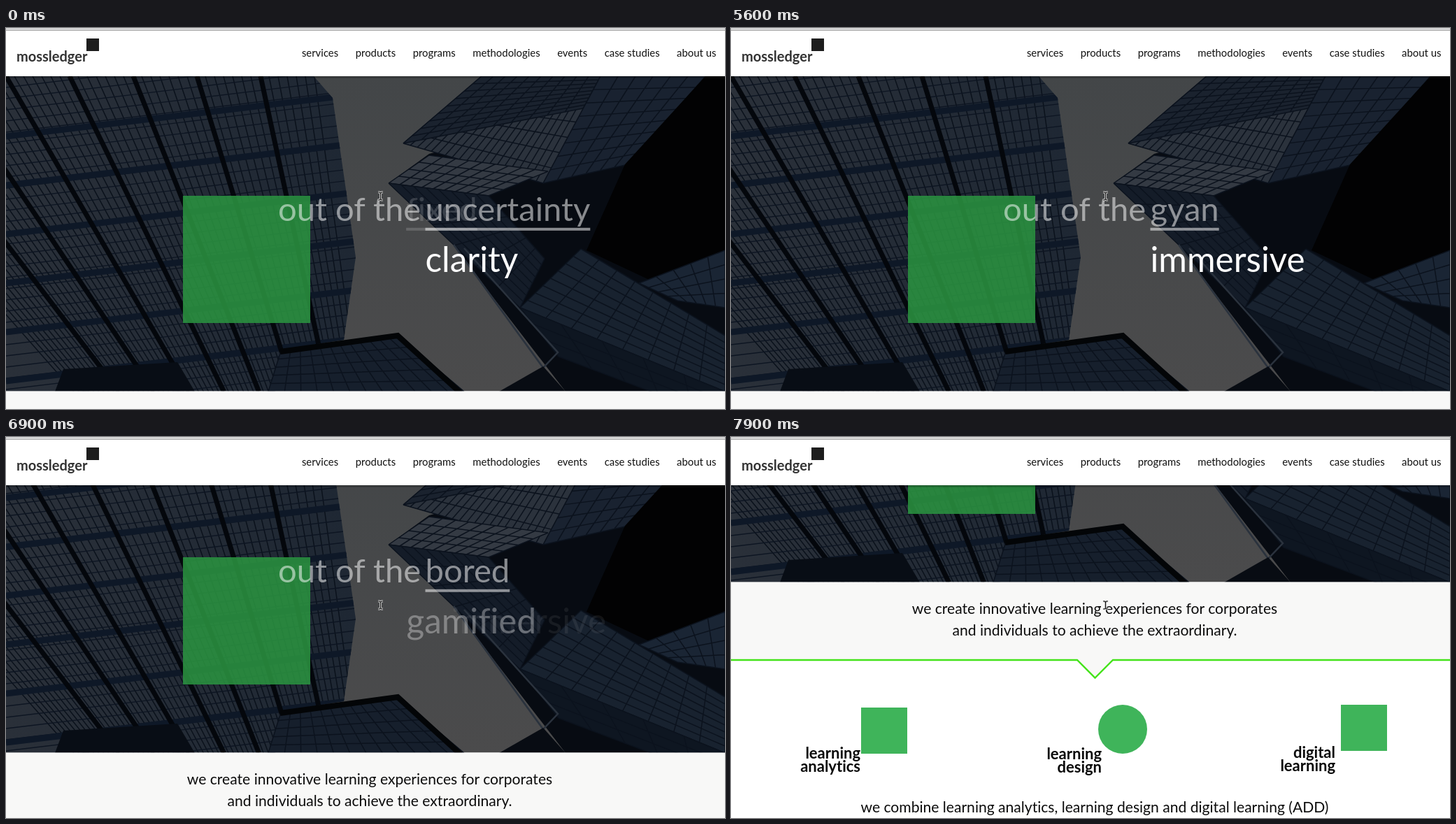
An HTML page that plays this animation: 1028x545 px, repeating every 8 s.

```html
<!DOCTYPE html>
<html lang="en">
<head>
<meta charset="utf-8">
<title>out of the</title>
<style>
  html, body { margin: 0; width: 100%; height: 100%; overflow: hidden; background: #fff; }
  svg { display: block; width: 1028px; height: 545px; font-family: Lato, "Open Sans", sans-serif; }
  .hero { font-size: 47.2px; fill: #fff; font-variant-ligatures: none; }
  .big { font-size: 49.4px; }
  .soft { opacity: .52; }
  .tag { font-size: 21.1px; text-anchor: middle; fill: #0c0c0c; font-variant-ligatures: none; }
  .nav { font-size: 14.9px; text-anchor: end; fill: #111; }
  .label { font-size: 22px; font-weight: 700; text-anchor: end; fill: #0a0a0a; font-variant-ligatures: none; }
  .name { font-size: 20px; font-weight: 700; fill: #333; }
</style>
</head>
<body>
<svg viewBox="0 0 1028 545">
  <defs>
    <clipPath id="heroBox"><rect y="69" width="1028" height="450.5"/></clipPath>
    <clipPath id="tower"><path id="towerEdge" d="M0 69H440L467 100L500 328L483 446L393 460L385 520H0Z"/></clipPath>
    <linearGradient id="sky" x1="0" y1="0" x2="0" y2="1">
      <stop offset="0" stop-color="#434648"/><stop offset="1" stop-color="#4b4b4c"/>
    </linearGradient>
    <linearGradient id="glass">
      <stop offset="0" stop-color="#2a3039"/><stop offset="1" stop-color="#1e2733"/>
    </linearGradient>
    <linearGradient id="shade" x1="0" y1="0" x2="0" y2="1">
      <stop offset="0" stop-opacity=".35"/><stop offset="1" stop-opacity="0"/>
    </linearGradient>
  </defs>

  <g id="page">
    <g clip-path="url(#heroBox)">
      <rect y="69" width="1028" height="451" fill="url(#sky)"/>
      <use href="#towerEdge" fill="url(#glass)"/>
      <g id="seams" clip-path="url(#tower)" fill="none"></g>
      <g id="blocks"></g>
      <rect x="253" y="240" width="182" height="182" fill="#2b9440" fill-opacity=".86"/>
      <text class="hero soft" x="389" y="275.5">out of the</text>
      <g id="words"></g>
    </g>
    <rect y="519.5" width="1028" height="111.5" fill="#f8f8f7"/>
    <path d="M-5 631H495L520.5 656.5L546 631H1033" fill="#f8f8f7" stroke="#44e31b" stroke-width="2.4"/>
    <text class="tag" x="520" y="565">we create innovative learning experiences for corporates</text>
    <text class="tag" x="520" y="596">and individuals to achieve the extraordinary.</text>
    <g fill="#3fb45a">
      <rect x="186" y="699" width="66" height="66"/>
      <circle cx="560" cy="730" r="35"/>
      <rect x="872" y="695" width="66" height="66"/>
    </g>
    <g class="label">
      <text x="185" y="772">learning<tspan x="185" dy="19">analytics</tspan></text>
      <text x="530" y="773">learning<tspan x="530" dy="19">design</tspan></text>
      <text x="864" y="771">digital<tspan x="864" dy="19">learning</tspan></text>
    </g>
    <text class="tag" x="520" y="849">we combine learning analytics, learning design and digital learning (ADD)</text>
  </g>

  <rect width="1028" height="69" fill="#fff"/>
  <rect width="1028" height="3" fill="#d6d6d6"/>
  <rect y="3" width="1028" height="1" fill="#a9a9a9"/>
  <rect y="69" width="1028" height="4" fill="url(#shade)"/>
  <text class="name" x="15" y="48">mossledger</text>
  <rect x="115" y="15" width="18" height="18" fill="#1d1d1d"/>
  <g id="nav"></g>
  <g fill="none">
    <path id="caret" d="M532 235h2.2l1.3 1.2l1.3-1.2h2.2M535.5 236v9M532 246h2.2l1.3-1.2l1.3 1.2h2.2"/>
    <use href="#caret" stroke="#ddd" stroke-width="3"/>
    <use href="#caret" stroke="#111" stroke-width="1.2"/>
  </g>
</svg>

<script>
const $ = id => document.getElementById(id);
const LOOP = 8000;

const range = (from, to, step) => Array.from({ length: Math.ceil((to - from) / step) }, (_, i) => from + i * step);
const poly = (pts, fill) => `<polygon points="${pts}" fill="${fill}"/>`;
const stroke = (d, color, w) => `<path d="${d}" fill="none" stroke="${color}" stroke-width="${w}"/>`;
const mix = (p, q, k) => p.map((n, i) => n + (q[i] - n) * k);

// Left tower: mullions fan out from the top, floors rise to the right
const mullion = x => `M${x} 69l${(.58 - .001 * x) * 451} 451`;
const floor = y => `M0 ${y}L500 ${y - 60}`;
$("seams").innerHTML =
  stroke(range(-300, 450, 13).map(mullion).join(""), "#0a111b", 1.5) +
  stroke(range(69, 580, 16).map(floor).join(""), "#0d1522", 1.3) +
  stroke(range(155, 580, 70).map(floor).join(""), "#0e1827", 9) +
  stroke(range(-182, 450, 91).map(mullion).join(""), "#04070c", 7) +
  poly("82,488 245,478 270,520 70,520", "#080d15");

// A four-cornered wall with evenly divided seams
function wall(pts, fill, cols, rows) {
  const [a, b, c, d] = pts.split(" ").map(p => p.split(",").map(Number));
  const line = (p, q, r, s, k) => `M${mix(p, q, k)}L${mix(r, s, k)}`;
  const seams = range(0, cols + 1, 1).map(i => line(a, b, d, c, i / cols))
    .concat(range(0, rows + 1, 1).map(j => line(a, d, b, c, j / rows)));
  return poly(pts, fill) + stroke(seams.join(""), "#0b121d", 1.5);
}

$("blocks").innerHTML =
  wall("393,462 560,440 655,520 375,520", "#161f2c", 12, 5) +
  stroke("M392 463L560 440L650 522", "#030507", 8) +
  poly("547,222 605,180 1028,69 1028,520 800,520 700,390 640,310", "#070b12") +
  wall("568,165 680,69 850,69 768,222", "#2b323c", 7, 20) +
  wall("568,165 680,69 850,69 825,115", "#1a222e", 9, 10) +
  wall("547,222 605,182 775,205 690,240", "#343a43", 4, 9) +
  wall("850,69 1000,69 890,195 768,222", "#192230", 6, 8) +
  wall("547,222 690,240 770,330 735,400", "#141c28", 8, 6) +
  poly("1000,69 1028,69 1028,330 930,365 830,318 885,195", "#020203") +
  wall("905,365 1028,318 1028,400 960,390", "#1a2534", 5, 4) +
  wall("735,400 822,316 1028,440 1028,520", "#18222f", 8, 8) +
  wall("735,400 1028,520 1028,560 790,470", "#0e1621", 5, 3) +
  stroke("M640 310L768 486L789 464L655 315", "#2a323d", 2.5) +
  poly("705,520 768,484 800,520", "#080c13");

const addText = (parent, cls, x, y, s) => {
  const el = document.createElementNS("http://www.w3.org/2000/svg", "text");
  el.setAttribute("class", cls);
  el.setAttribute("x", x);
  el.setAttribute("y", y);
  el.textContent = s;
  parent.append(el);
  return el.getComputedTextLength();
};

// Menu, laid out from the right edge
let right = 1015.5;
for (const s of ["about us", "case studies", "events", "methodologies", "programs", "products", "services"])
  right -= addText($("nav"), "nav", right, 41, s) + 24.5;

// Each scene swaps one pair of words for the next
const SLIDE = 40;
const CUT = 5600;
const SCENES = [
  { swap: -300, from: ["uncertainty", "clarity"], to: ["fixed", "personalised"] },
  { swap: 5740, from: ["gyan", "immersive"], to: ["bored", "gamified"] }
];
// Delay and duration per line, counted from the swap
const ENTER = [{ delay: 0, span: 950 }, { delay: 900, span: 800 }];
const LEAVE = [{ delay: 300, span: 660 }, { delay: 320, span: 900 }];

const clamp = k => Math.min(1, Math.max(0, k));

function makeWord(s, line, scene, entering) {
  const g = document.createElementNS("http://www.w3.org/2000/svg", "g");
  $("words").append(g);
  const width = addText(g, line ? "hero big" : "hero", 599.5, line ? 348.5 : 275.5, s);
  if (!line) g.innerHTML += `<rect x="599.5" y="285.8" width="${width}" height="4" fill="#fff"/>`;
  const { delay, span } = (entering ? ENTER : LEAVE)[line];
  const alpha = line ? 1 : .52;
  return t => {
    const k = clamp((t - SCENES[scene].swap - delay) / span);
    const shown = scene === +(t >= CUT) ? (entering ? k : 1 - k) : 0;
    g.setAttribute("transform", `translate(${SLIDE * (entering ? k - 1 : k)} 0)`);
    g.setAttribute("opacity", alpha * shown);
  };
}

const words = SCENES.flatMap(({ from, to }, i) => [
  ...from.map((s, line) => makeWord(s, line, i, false)),
  ...to.map((s, line) => makeWord(s, line, i, true))
]);

// The screen refreshes every 100 ms at first, later about every 157 ms
const TICKS = [
  ...range(0, 1500, 100), CUT,
  ...range(5985, 7600, 157).map(t => Math.floor(t / 100) * 100), 7900
];

function scrollAt(t) {
  const k = clamp((t - 6450) / 1500);
  return 313 * k * k * (3 - 2 * k);
}

function draw(time) {
  const t = TICKS.findLast(k => k <= time);
  $("page").setAttribute("transform", `translate(0 ${-Math.round(scrollAt(t))})`);
  words.forEach(update => update(t));
}

const start = performance.now();
function frame() {
  draw((performance.now() - start) % LOOP);
  requestAnimationFrame(frame);
}
frame();
</script>
</body>
</html>
```
